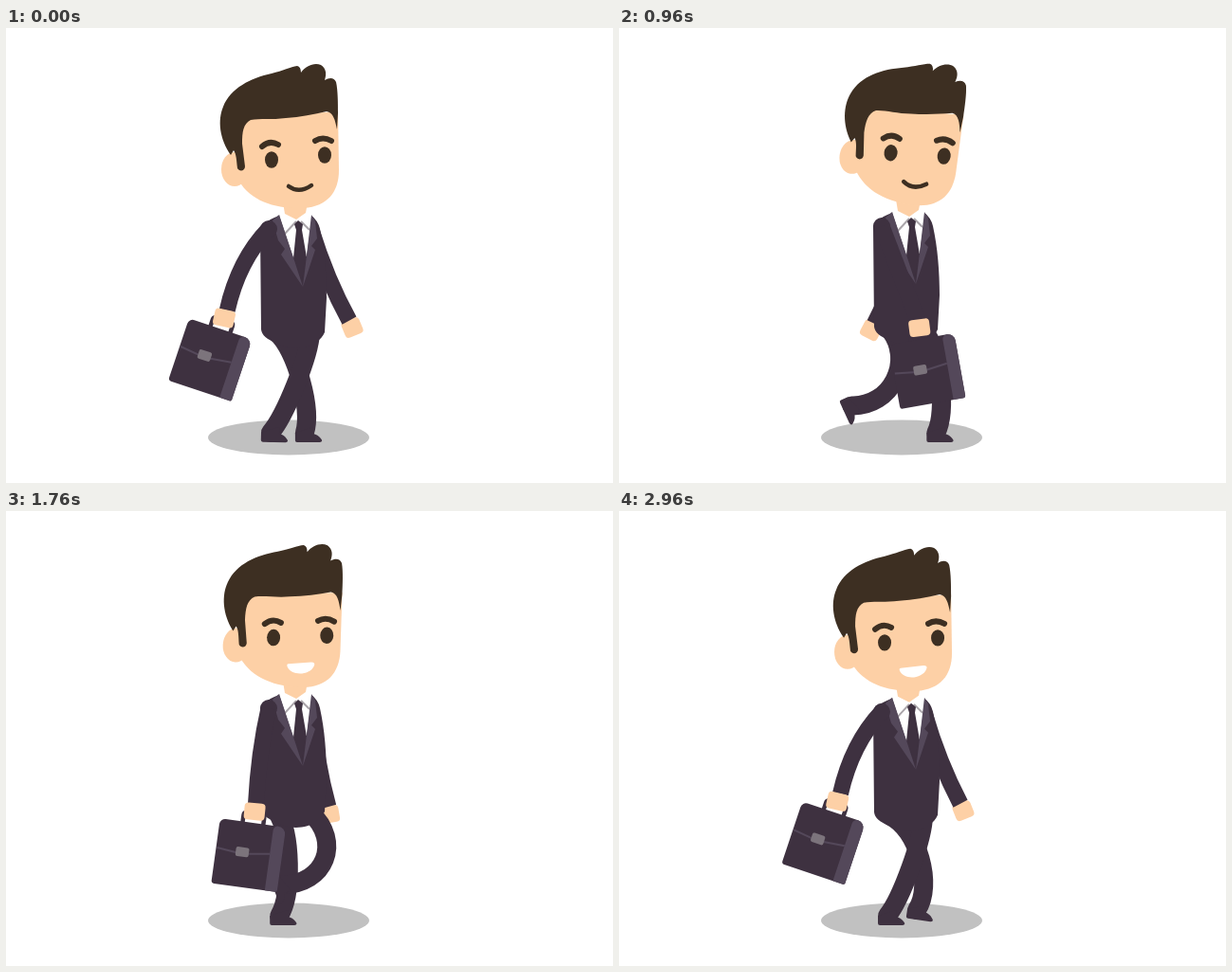
An HTML page with a canvas for the animation above (3000 ms loop, 640 px wide and 480 px high).

```html
<!DOCTYPE html>
<html>
<head>
<meta charset="utf-8">
<style>
html, body { margin: 0; width: 100%; height: 100%; overflow: hidden; background: #fff; }
canvas { display: block; }
</style>
</head>
<body>
<canvas id="stage" width="640" height="480"></canvas>
<script>
const ctx = document.getElementById('stage').getContext('2d');
const STRIDE = 1500, LOOP = 2 * STRIDE;
const GROUND = 427, LIFT = 37, PACE = 77, HALF_LEG = 56;
const SUIT = '#3e3140', LAPEL = '#54485a', SKIN = '#fdd0a6', HAIR = '#3d2f22',
      SHADE = '#c1c1c1', CLASP = '#7c747c', WHITE = '#fff';

const mix = (a, b, u) => a + (b - a) * u;
const smooth = u => u * u * (3 - 2 * u);

function fill(d, color) {
  ctx.fillStyle = color;
  ctx.fill(new Path2D(d));
}

function line(d, color, width, cap = 'butt') {
  ctx.strokeStyle = color;
  ctx.lineWidth = width;
  ctx.lineCap = cap;
  ctx.lineJoin = 'round';
  ctx.stroke(new Path2D(d));
}

function oval(x, y, rx, ry, color) {
  ctx.fillStyle = color;
  ctx.beginPath();
  ctx.ellipse(x, y, rx, ry, 0, 0, 7);
  ctx.fill();
}

function box(x, y, w, h, r, color) {
  ctx.fillStyle = color;
  ctx.beginPath();
  ctx.roundRect(x, y, w, h, r);
  ctx.fill();
}

function placed(x, y, angle, draw) {
  ctx.save();
  ctx.translate(x, y);
  ctx.rotate(angle);
  draw();
  ctx.restore();
}

const degrees = d => d * Math.PI / 180;

// First half of the cycle slides the foot back on the ground, second half swings it forward
function ankle(cycle, front) {
  const u = cycle * 2 - 1;
  if (u < 0) return { x: front - PACE * (u + 1), y: GROUND, turn: 0 };
  return {
    x: front - PACE + PACE * smooth(u ** 1.3),
    y: GROUND - LIFT * Math.sin(Math.PI * u),
    turn: degrees(70 * Math.sin(Math.PI * u ** 0.75))
  };
}

// The knee bulges forward as far as the leg length allows
function leg(hipX, hipY, foot) {
  const dx = foot.x - hipX, dy = foot.y - hipY, d = Math.hypot(dx, dy);
  const bulge = 1.1 * Math.sqrt(Math.max(49, HALF_LEG ** 2 - d * d / 4));
  const bend = k => `${hipX + dx * k + bulge * dy / d} ${hipY + dy * k - bulge * dx / d}`;
  line(`M${hipX} ${hipY}C${bend(0.2)} ${bend(0.8)} ${foot.x} ${foot.y}`, SUIT, 20, 'round');
  placed(foot.x, foot.y, foot.turn, () =>
    fill('M-10 0V8Q-10 10 -8 10H16Q20 9 17 6Q14 2 9 1V-6Z', SUIT));
}

function sleeve(sx, sy, wx, wy, bendX, bendY) {
  line(`M${sx} ${sy}Q${(sx + wx) / 2 + bendX} ${(sy + wy) / 2 + bendY} ${wx} ${wy}`, SUIT, 17);
}

function farArm(x, y, bob) {
  const sx = 322, sy = 213 + bob, angle = Math.atan2(sx - x, y - sy);
  placed(x, y, angle, () => box(-10, -9, 20, 18, 4, SKIN));
  sleeve(sx, sy, x + 8 * Math.sin(angle), y - 8 * Math.cos(angle), -4, 4);
}

function nearArm(x, y, bob, turn, bend) {
  const sx = 277, sy = 212 + bob;
  oval(sx, sy, 9, 9, SUIT);
  sleeve(sx, sy, x + 10 * turn, y - 8, -bend, -bend);
  placed(x, y, turn * 0.7, () => box(-11, -9, 22, 18, 4, SKIN));
}

function briefcase() {
  line('M-11 15V5Q-11 2 -7 2H7Q11 2 11 5V15', SUIT, 4.5);
  box(-35, 12, 70, 69, [6, 8, 2, 3], SUIT);
  box(22, 12, 13, 69, [5, 8, 2, 0], LAPEL);
  line('M-34 43L-7 46L22 42', LAPEL, 2);
  box(-14, 39, 14, 10, 2, CLASP);
}

function torso() {
  fill('M268 212Q273 204 283 200L290 197L321 197Q329 203 331 212C336 235 338 260 338 285'
    + 'L336 321Q333 328 327 331C318 340 295 340 285 332Q270 327 269 318Z', SUIT);
  fill('M288 198L293 191H317L323 198L317 241L303 243Z', WHITE);
  fill('M292 184H318L316 195L306 202L294 196Z', SKIN);
  line('M294 217L306 204M311 204L320 213', '#aaa5aa', 2);
  fill('M304 207L308 203L313 207L312 213L317 242L312 266L303 243L306 213Z', SUIT);
  fill('M281 203L288 197L301 236L313 273L290 239L294 233L287 224Z', LAPEL);
  fill('M322 197L326 204L328 222L322 230L326 234L313 273L317 240Z', LAPEL);
}

function head(open) {
  oval(241, 149, 14, 18, SKIN);
  fill('M246 95L350 88L351 150C351 173 339 188 314 190C284 191 259 183 246 162Z', SKIN);
  fill('M237 134C225 117 223 97 229 83C237 63 258 53 280 48C292 45 300 41 307 40'
    + 'Q311 41 311 47C316 40 325 36 332 39C338 43 338 49 336 55C341 52 346 52 348 57'
    + 'C350 66 350 80 350 90L349 107C347 97 345 89 338 88C325 91 310 94 295 95'
    + 'C280 97 268 95 258 97C250 101 249 110 249 122L252 146C252 151 246 152 244 148'
    + 'C243 140 243 133 240 129Z', HAIR);
  line('M270 125Q278 118 287 123M326 119Q334 114 343 119', HAIR, 6, 'round');
  oval(280, 139, 7, 8.7, HAIR);
  oval(336, 134, 7, 8.7, HAIR);
  if (open) fill('M297 166L321 163Q326 163 324 167C320 177 301 179 296 169Q295 166 297 166Z', WHITE);
  else line('M298 167Q309 175 322 166', HAIR, 4.5, 'round');
}

function draw(now) {
  const time = now % LOOP, cycle = time % STRIDE / STRIDE;
  const c = Math.cos(2 * Math.PI * cycle), s = Math.sin(2 * Math.PI * cycle);
  const bob = -5 * s * s, tilt = degrees(5.2 * (1 - c)), swing = degrees(0.5 + 18 * c - s);
  const handX = 284.5 - 54.5 * c + 3 * s, handY = 307.5 - 1.5 * c + 13 * s * s;

  ctx.fillStyle = WHITE;
  ctx.fillRect(0, 0, 640, 480);
  oval(298, 432, 85, 18.5, SHADE);
  farArm(308 + 57 * c + 8 * s, 316 + 5 * s * s, bob);
  leg(286, 322 + bob, ankle(cycle, 315));
  leg(321, 322 + bob, ankle((cycle + 0.5) % 1, 356));
  placed(0, bob, 0, torso);
  placed(312, 181 + bob, tilt, () => {
    ctx.translate(-312, -181);
    head(time >= STRIDE);
  });
  placed(handX, handY, swing, briefcase);
  nearArm(handX, handY, bob, swing, 10 * mix(0.5, 1, c) ** 3);
}

const start = performance.now();
function tick() {
  draw(performance.now() - start);
  requestAnimationFrame(tick);
}
tick();
</script>
</body>
</html>
```
